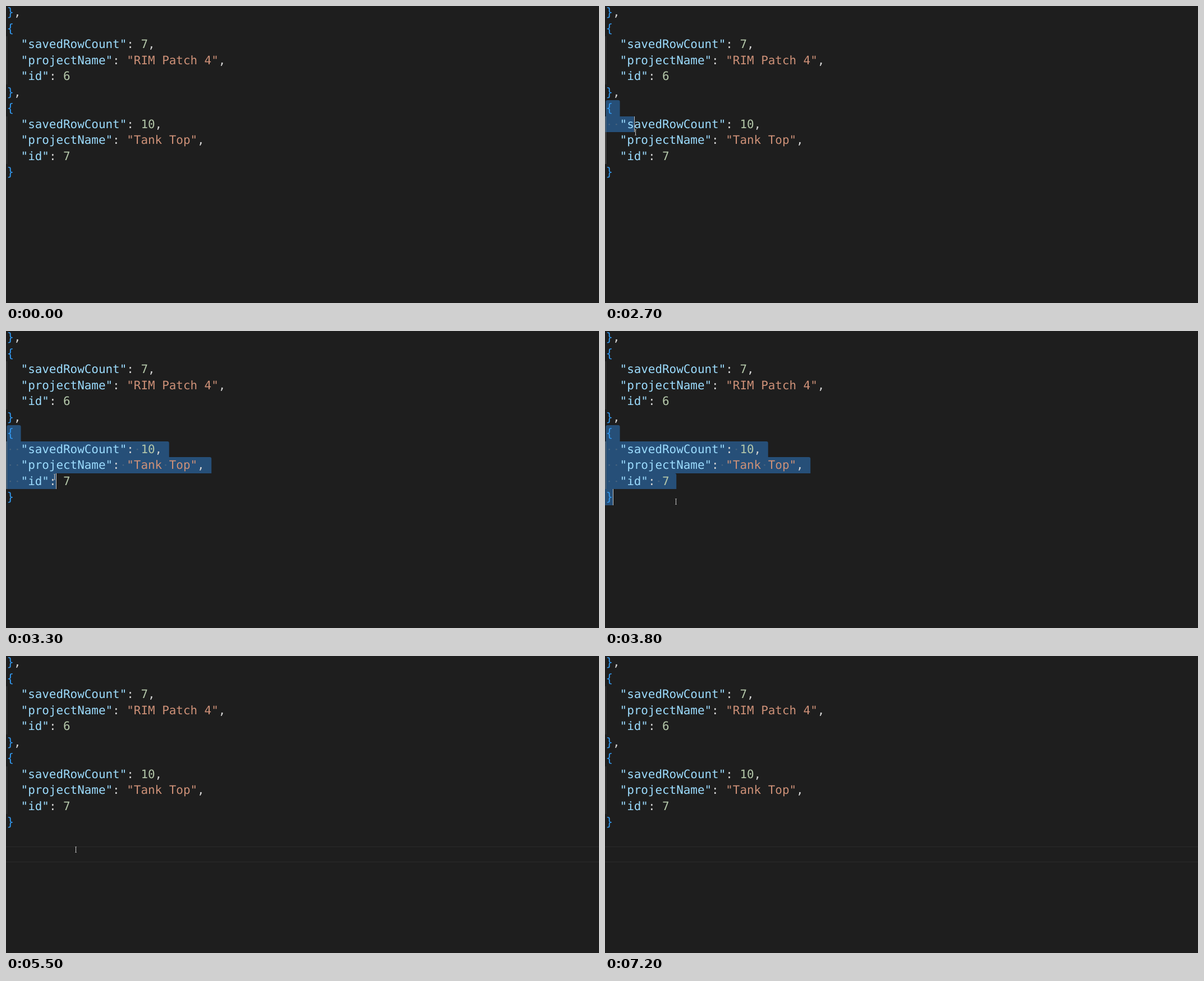
Animation, 1057 px wide and 530 px high, one loop 8000 ms. Source, as an HTML page with a canvas:

```html
<!DOCTYPE html>
<html lang="en">
<head>
<meta charset="utf-8">
<title>JSON selection</title>
<style>
  html, body { margin: 0; height: 100%; overflow: hidden; background: #1e1e1e; }
  canvas { display: block; }
</style>
</head>
<body>
<canvas id="stage" width="1057" height="530"></canvas>
<script>
const ctx = document.getElementById('stage').getContext('2d');
const LOOP = 8000, STEP = 100;
const LEFT = 1.4, CHAR = 12.58, TOP = -3, ROW = 28.53;

const record = (count, name, id) =>
  ['{', `  "savedRowCount": ${count},`, `  "projectName": "${name}",`, `  "id": ${id}`];
const lines = ['},', ...record(7, 'RIM Patch 4', 6), '},', ...record(10, 'Tank Top', 7), '}'];

const FIRST_ROW = 6, EMPTY_ROW = 12;
const PRESS = 2100, RELEASE = 3800, DESELECT = 5400, BLINK = 500;

const start = { x: 20, y: 62 };
const moves = [
  { from: 400, to: 500, x: 3, y: 27 },
  { from: 600, to: 1200, x: 5, y: 190 },
  { from: 1600, to: 1700, x: 7.5, y: 188.5 },
  { from: 2000, to: 2400, x: 57, y: 219 },
  { from: 2600, to: 2700, x: 54, y: 225 },
  { from: 2700, to: RELEASE, x: 126.5, y: 304 },
  { from: 4000, to: 4300, x: 129.5, y: 355 },
  { from: 5200, to: 5500, x: 124.5, y: 345 },
  { from: 6000, to: 6900, x: 889.5, y: 65.5 },
  { from: 6900, to: 7100, x: 949.5, y: 8 }
];

const within = (t, from, to) => t >= from && t < to;
const colX = col => LEFT + col * CHAR;
const rowY = row => Math.round(TOP + row * ROW);
const rowHeight = (row, count = 1) => rowY(row + count) - rowY(row);

function pointerAt(t) {
  let { x, y } = start;
  for (const move of moves) {
    const u = Math.min(1, Math.max(0, (t - move.from) / (move.to - move.from)));
    const k = u ** 1.3;
    x += (move.x - x) * k;
    y += (move.y - y) * k;
  }
  return { x, y };
}

// The caret follows the pointer until the button is released.
function caretAt(t) {
  const { x, y } = pointerAt(Math.min(t, RELEASE));
  const row = Math.min(lines.length - 1, Math.floor((y - TOP) / ROW));
  const col = Math.min(lines[row].length, Math.round((x - LEFT) / CHAR));
  return { row, col };
}

function rect(color, x, y, w, h) {
  ctx.fillStyle = color;
  ctx.fillRect(x, y, w, h);
}

function drawSelection(caret) {
  for (let row = FIRST_ROW; row <= caret.row; row++) {
    const isFirst = row === FIRST_ROW, isLast = row === caret.row;
    const end = isLast ? caret.col : lines[row].length + 1;
    const x = isFirst ? LEFT : 0, y = rowY(row), round = isLast ? 0 : 3;
    ctx.fillStyle = '#264f78';
    ctx.beginPath();
    ctx.roundRect(x, y, Math.max(0, colX(end) - x), rowHeight(row), [isFirst ? 3 : 0, round, 0, 0]);
    ctx.fill();
    // Whitespace dots inside the selection
    ctx.fillStyle = '#4a6580';
    for (const { index } of lines[row].slice(0, end).matchAll(/ /g)) {
      ctx.beginPath();
      ctx.arc(colX(index + 0.5), y + ROW / 2, 1.3, 0, 7);
      ctx.fill();
    }
  }
}

const drawGuide = (row, color) => rect(color, 1, rowY(row), 1, rowHeight(row, 3));

function tokenColor(token, after) {
  if (token[0] === '"') return after === ':' ? '#9cdcfe' : '#ce9178';
  if (/\d/.test(token)) return '#b5c8aa';
  return /[{}]/.test(token) ? '#3399f0' : '#d4d4d4';
}

function drawText() {
  ctx.font = '20.9px "DejaVu Sans Mono", monospace';
  ctx.textRendering = 'geometricPrecision';
  lines.forEach((line, row) => {
    for (const { 0: token, index } of line.matchAll(/"[^"]*"|\d+|[{}:,]/g)) {
      ctx.fillStyle = tokenColor(token, line[index + token.length]);
      ctx.fillText(token, colX(index), TOP + row * ROW + 21);
    }
  });
}

function drawCaret({ row, col }) {
  rect('#c4c5c3', Math.round(colX(col)), rowY(row), 1, rowHeight(row));
}

function drawPointer({ x, y }) {
  const left = Math.round(x - 0.5), top = Math.round(y - 5.5);
  rect('#c8c8c8', left, top, 1, 11);
  for (const end of [0, 10]) rect('#8c8c8c', left - 1, top + end, 3, 1);
}

function draw(t) {
  const selecting = within(t, PRESS, DESELECT);
  rect('#1e1e1e', 0, 0, 1057, 530);
  if (t >= DESELECT) {
    for (const y of [rowY(EMPTY_ROW) + 1, rowY(EMPTY_ROW + 1) - 1]) rect('#2a2a2a', 0, y, 1057, 1);
  }
  const caret = selecting && caretAt(t);
  if (caret) drawSelection(caret);
  drawGuide(2, '#404040');
  drawGuide(7, selecting ? '#707070' : '#404040');
  drawText();
  const blinkOn = t <= RELEASE || Math.floor((t - 3600) / BLINK) % 2 === 0;
  if (caret && blinkOn) drawCaret(caret);
  if (within(t, 400, 600) || within(t, 1200, 7200)) drawPointer(pointerAt(t));
}

function frame() {
  draw(Math.floor(performance.now() % LOOP / STEP) * STEP);
  requestAnimationFrame(frame);
}
frame();
</script>
</body>
</html>
```
